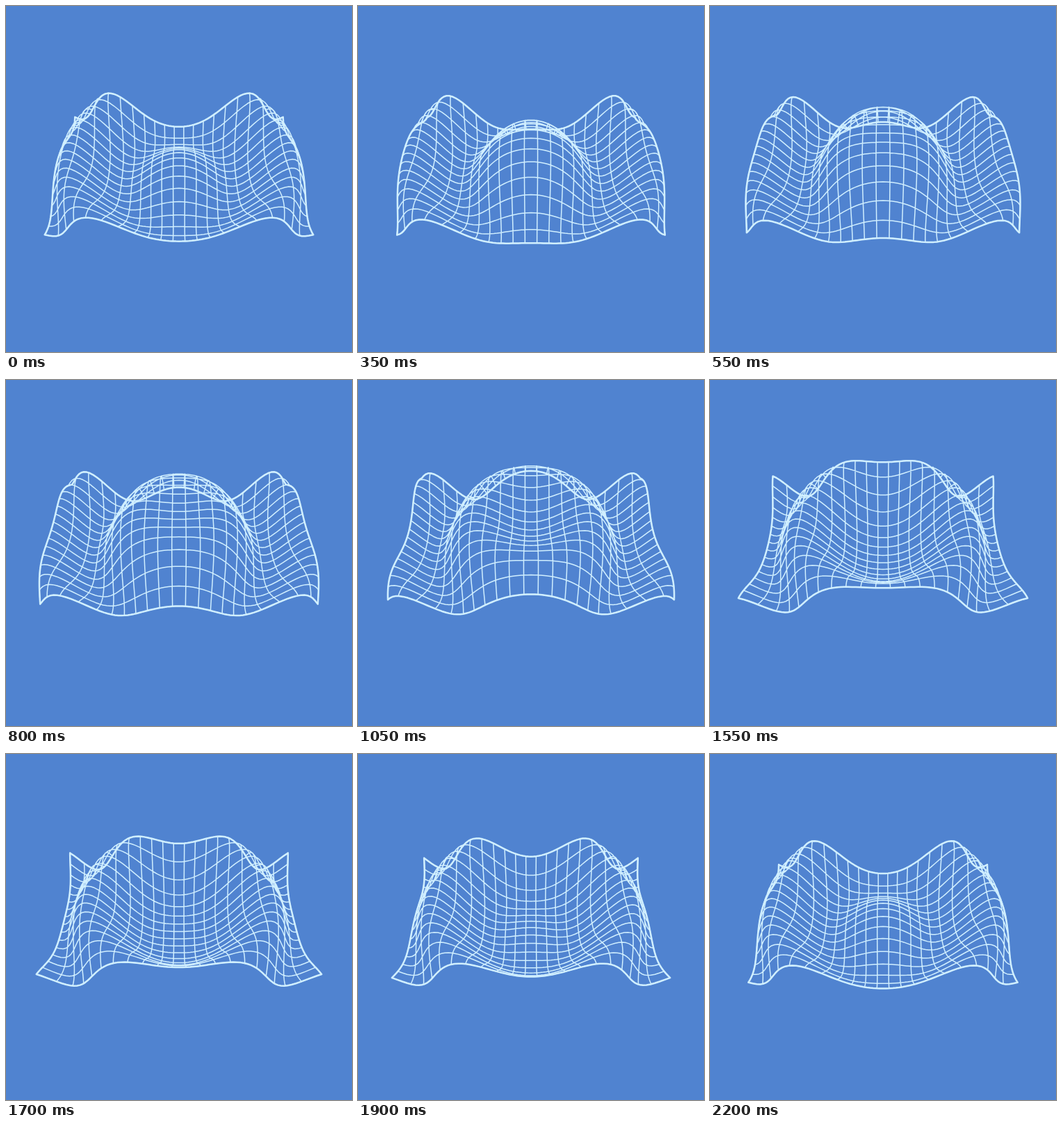
An HTML page with a canvas that plays this animation: 498 by 498 pixels, repeating every 2250 ms.

```html
<!DOCTYPE html>
<html lang="en">
<head>
<meta charset="utf-8">
<title>Ripple grid</title>
<style>
  html, body { margin: 0; width: 100%; height: 100%; overflow: hidden; background: #5083d0; }
  canvas { display: block; width: 498px; height: 498px; }
</style>
</head>
<body>
<canvas id="stage" width="498" height="498"></canvas>
<script>
const ctx = document.getElementById('stage').getContext('2d');
const SIZE = 498, MID = SIZE / 2;

// Timing: the wave advances in steps and rests briefly once per loop
const LOOP = 2250, STEP = 50, REST_AT = 13, REST = 2;

// Sheet: half width 1, half depth DEPTH
const COLS = 21, ROWS = 15, DEPTH = 0.6;

// Camera: tilt of one radian, 60 degree field of view
const FOCAL = 431.3, UNIT = 174.2, LIFT = 24.6;
const SIN = Math.sin(1), COS = Math.cos(1);

// Ripple: phase grows with the squared radius, height fades outwards
const HEIGHT = 0.403, FADE = 0.94, RATE = 6.2;
const CREST = 10.57, STEPS_PER_WAVE = 42.65;

function project(x, y, phase) {
  const r2 = x * x + y * y;
  const z = HEIGHT * Math.exp(-FADE * r2) * Math.cos(phase - RATE * r2);
  const up = (y * SIN + z * COS) * UNIT + LIFT;
  const away = (y * COS - z * SIN) * UNIT;
  const k = FOCAL / (FOCAL + away);
  return [MID + x * UNIT * k, MID - up * k];
}

function addLine(x0, y0, x1, y1, phase) {
  const n = 80;
  for (let i = 0; i <= n; i++) {
    const p = project(x0 + (x1 - x0) * i / n, y0 + (y1 - y0) * i / n, phase);
    if (i) ctx.lineTo(...p); else ctx.moveTo(...p);
  }
}

function strokeGrid(width, colStep, rowStep, phase) {
  ctx.beginPath();
  for (let i = 0; i <= COLS; i += colStep) {
    const x = 2 * i / COLS - 1;
    addLine(x, -DEPTH, x, DEPTH, phase);
  }
  for (let j = 0; j <= ROWS; j += rowStep) {
    const y = DEPTH * (2 * j / ROWS - 1);
    addLine(-1, y, 1, y, phase);
  }
  ctx.lineWidth = width;
  ctx.stroke();
}

function draw(t) {
  const slot = Math.floor(t / STEP);
  const step = slot - Math.min(REST, Math.max(0, slot - REST_AT));
  const phase = 2 * Math.PI * (step - CREST) / STEPS_PER_WAVE;
  ctx.fillStyle = '#5083d0';
  ctx.fillRect(0, 0, SIZE, SIZE);
  ctx.strokeStyle = '#d0efff';
  ctx.lineCap = ctx.lineJoin = 'round';
  strokeGrid(1.5, 1, 1, phase);
  strokeGrid(2.5, COLS, ROWS, phase); // border only
}

const start = performance.now();
function tick() {
  draw((performance.now() - start) % LOOP);
  requestAnimationFrame(tick);
}
tick();
</script>
</body>
</html>
```
